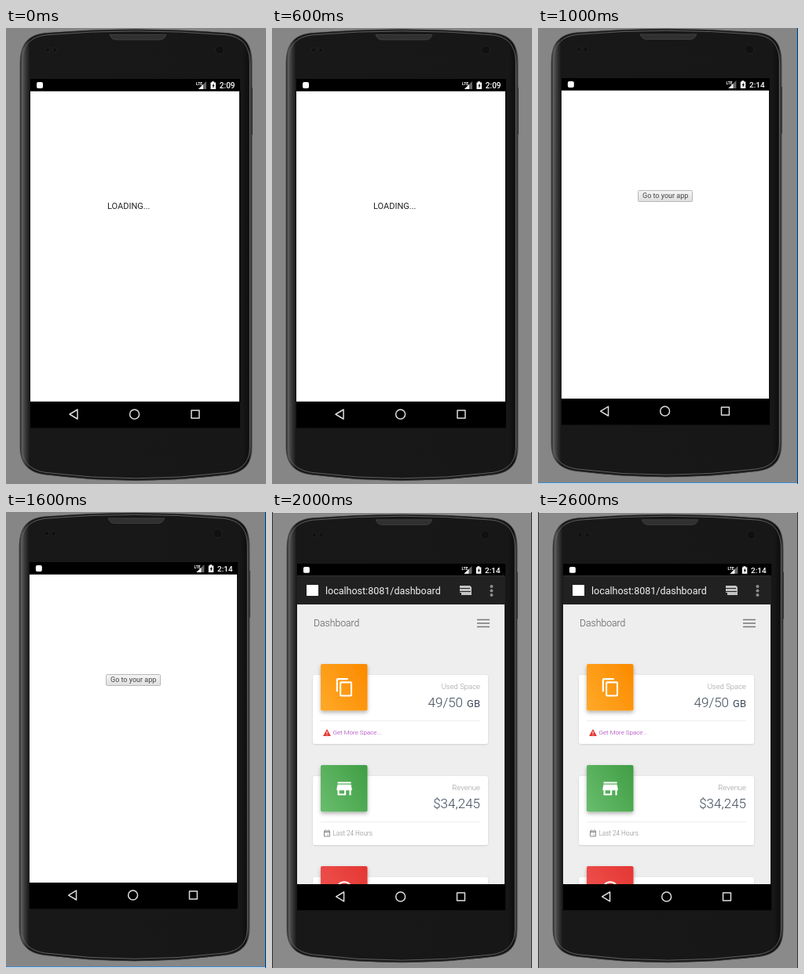
These frames come from a looping animation (331x582 px, 3000 ms). An HTML page:

```html
<!DOCTYPE html>
<html lang="en">
<head>
<meta charset="utf-8">
<title>App loading demo</title>
<style>
  html, body { margin: 0; width: 100%; height: 100%; overflow: hidden; background: #868686; }
  svg { display: block; font-family: Roboto, sans-serif; }
  .scene { visibility: hidden; }
  .light { font-weight: 300; }
  .end { text-anchor: end; }
</style>
</head>
<body>
<svg width="331" height="582" viewBox="0 0 331 582">
  <defs>
    <linearGradient id="side">
      <stop offset="0" stop-color="#2a2a2a"/>
      <stop offset=".01" stop-color="#585858"/>
      <stop offset=".022" stop-color="#3c3c3c"/>
      <stop offset=".042" stop-color="#181818"/>
      <stop offset=".96" stop-color="#171717"/>
      <stop offset=".985" stop-color="#0f0f0f"/>
      <stop offset="1" stop-color="#444"/>
    </linearGradient>
    <linearGradient id="orange" x1="0" y1=".8" x2="1" y2=".2"><stop stop-color="#ffa726"/><stop offset="1" stop-color="#fb8c00"/></linearGradient>
    <linearGradient id="green" x1="0" y1=".8" x2="1" y2=".2"><stop stop-color="#66bb6a"/><stop offset="1" stop-color="#43a047"/></linearGradient>
    <linearGradient id="red" x1="0" y1=".8" x2="1" y2=".2"><stop stop-color="#ef5350"/><stop offset="1" stop-color="#e53935"/></linearGradient>
    <linearGradient id="button" x2="0" y2="1"><stop stop-color="#f6f6f6"/><stop offset="1" stop-color="#dedede"/></linearGradient>
    <filter id="shadow" x="-20%" y="-20%" width="140%" height="150%">
      <feDropShadow dx="0" dy=".7" stdDeviation="1.2" flood-opacity=".15"/>
    </filter>
    <filter id="lift" x="-20%" y="-20%" width="140%" height="150%">
      <feDropShadow dx="0" dy="2.5" stdDeviation="2.5" flood-opacity=".3"/>
    </filter>
    <clipPath id="page"><path d="M32 118H296V475H32Z"/></clipPath>
    <g id="card">
      <rect x="52" y="208" width="223" height="88" rx="3" fill="#fff" filter="url(#shadow)"/>
      <path d="M62 266.5H265" stroke="#eee"/>
      <rect x="62" y="194" width="59.5" height="59.5" rx="2" filter="url(#lift)"/>
    </g>
  </defs>

  <rect id="backdrop" width="331" height="582" fill="#868686"/>

  <g id="phone">
    <path d="M312 76h2v60h-2z" fill="#333"/>
    <path d="M18 46C18 20 28 9 50 6.500Q165-3 282 6.500C304 9 313 20 313 46V534C313 556 304 567 282 570Q165 585 50 570C28 567 18 556 18 534Z" fill="url(#side)" stroke="#3a3a3a" stroke-width=".8"/>
    <path d="M20.500 47C20.500 22 30 11.500 52 8.800Q165-1 280 8.800C301 11.500 310.500 22 310.500 47V533C310.500 554 301 564.500 280 567.500Q165 582 52 567.500C30 564.500 20.500 554 20.500 533Z" fill="none" stroke="#606060"/>
    <path d="M132 8.500H204Q202 15 196 15H140Q134 15 132 8.500Z" fill="#303030" stroke="#4a4a4a" stroke-width=".7"/>
    <g fill="#101010" stroke="#222">
      <circle cx="53" cy="28" r="3"/><circle cx="62" cy="28" r="3"/><circle cx="272" cy="28" r="5.500"/>
    </g>
    <path d="M31 65H298V510.500H31Z"/>
    <path d="M31 80.800H297V476.800H31Z" fill="#fff"/>
    <g fill="#fff">
      <rect x="39" y="69" width="8" height="8" rx="2"/>
      <text x="242" y="73" font-size="5" font-weight="700">LTE</text>
      <path d="M255 68V78H245Z" fill="#666"/>
      <path d="M251 72V78H245Z"/>
      <path d="M260.500 69.500H262V68.300H265V69.500H267V78H260.500Z"/>
      <path d="M264.500 70.500L262.500 74H263.500V77L265.500 73H264.500Z" fill="#000"/>
      <text id="clock" x="291.500" y="77" font-size="10" font-weight="500" class="end"></text>
    </g>
    <g fill="none" stroke="#ddd" stroke-width="1.500" stroke-linejoin="round">
      <path d="M91 487V499L81 493Z"/><circle cx="163.600" cy="493" r="6"/><path d="M236 488H246V498H236Z"/>
    </g>
  </g>

  <g class="scene">
    <text x="129" y="231" font-size="11" fill="#222">LOADING...</text>
  </g>

  <g class="scene">
    <rect x="127.500" y="207.500" width="69" height="14" rx="1" fill="url(#button)" stroke="#b8b8b8"/>
    <text x="133" y="217.300" font-size="9" fill="#444">Go to your app</text>
    <path d="M0 581.500H331" stroke="#ddd"/>
    <path d="M0 580.500H329.500V0" fill="none" stroke="#3c8fd6"/>
    <path d="M330.500 0V582" stroke="#333"/>
  </g>

  <g class="scene">
    <path d="M0 .5H331" stroke="#e4e4e4"/>
    <path d="M.5 0V582M330.500 0V582" stroke="#333"/>
    <path d="M32 81.500H297V118H32Z" fill="#212121"/>
    <path d="M44 93H59V107H44Z" fill="#fff"/>
    <text x="68" y="105" font-size="12.500" fill="#f2f2f2">localhost:8081/dashboard</text>
    <path d="M239 94H252L254 96V106H241V103H239Z" fill="#c4c4c4"/>
    <path d="M239 97.500H252M239 101.500H253" stroke="#212121"/>
    <g fill="#8e8e8e"><circle cx="279.500" cy="95" r="2"/><circle cx="279.500" cy="100.500" r="2"/><circle cx="279.500" cy="106" r="2"/></g>
    <g clip-path="url(#page)">
      <path d="M32 118H296V475H32Z" fill="#eee"/>
      <text x="53" y="145.500" font-size="12.200" class="light" fill="#555">Dashboard</text>
      <path d="M261 137.500H277M261 142H277M261 146.500H277" stroke="#777" stroke-width="1.500"/>

      <use href="#card" fill="url(#orange)"/>
      <path transform="translate(79.600 211) scale(1.070)" fill="#fff" fill-rule="evenodd" d="M16 1H4Q2 1 2 3V17H4V3H16ZM19 5H8Q6 5 6 7V21Q6 23 8 23H19Q21 23 21 21V7Q21 5 19 5ZM19 21H8V7H19Z"/>
      <g class="light end" fill="#3c4858">
        <text x="265" y="226" font-size="9.500" fill="#999">Used Space</text>
        <text x="243" y="249" font-size="17">49/50</text>
        <text x="265" y="249" font-size="13" font-weight="400">GB</text>
      </g>
      <path d="M70 277L75 286H65Z" fill="#e53935"/>
      <path d="M70 280V283M70 284V285" stroke="#fff"/>
      <text x="77.500" y="284.300" font-size="8" class="light" fill="#9c27b0">Get More Space...</text>

      <use href="#card" y="129" fill="url(#green)"/>
      <path transform="translate(79.200 340.200) scale(1.070)" fill="#fff" fill-rule="evenodd" d="M20 4H4V6H20ZM21 14V12L20 7H4L3 12V14H4V20H14V14H18V20H20V14ZM12 18H6V14H12Z"/>
      <g class="light end" fill="#3c4858">
        <text x="265" y="355" font-size="9.500" fill="#999">Revenue</text>
        <text x="265" y="378" font-size="17">$34,245</text>
      </g>
      <path d="M66.500 407H73.500V414H66.500ZM66.500 408.500H73.500M68 405.500V407M72 405.500V407M70.500 412H72" fill="none" stroke="#888"/>
      <text x="77.500" y="413" font-size="8.200" class="light" fill="#888">Last 24 Hours</text>

      <use href="#card" y="258" fill="url(#red)"/>
      <circle cx="92" cy="482" r="9.700" fill="none" stroke="#fff" stroke-width="2.100"/>
    </g>
  </g>
</svg>
<script>
  const SCENE_MS = 1000;
  const phone = document.getElementById("phone");
  const clock = document.getElementById("clock");
  const backdrop = document.getElementById("backdrop");
  const groups = document.querySelectorAll(".scene");
  const scenes = [
    { time: "2:09", pose: "", gray: "#868686" },
    { time: "2:14", pose: "translate(-.85 -.5) scale(.993)", gray: "#868686" },
    { time: "2:14", pose: "translate(1.2 1.4) scale(.993)", gray: "#8a8a8a" }
  ];
  const start = performance.now();

  function draw() {
    const current = Math.floor((performance.now() - start) / SCENE_MS) % scenes.length;
    const { time, pose, gray } = scenes[current];
    groups.forEach((group, i) => group.style.visibility = i === current ? "visible" : "hidden");
    phone.setAttribute("transform", pose);
    clock.textContent = time;
    backdrop.setAttribute("fill", gray);
    requestAnimationFrame(draw);
  }
  draw();
</script>
</body>
</html>
```
